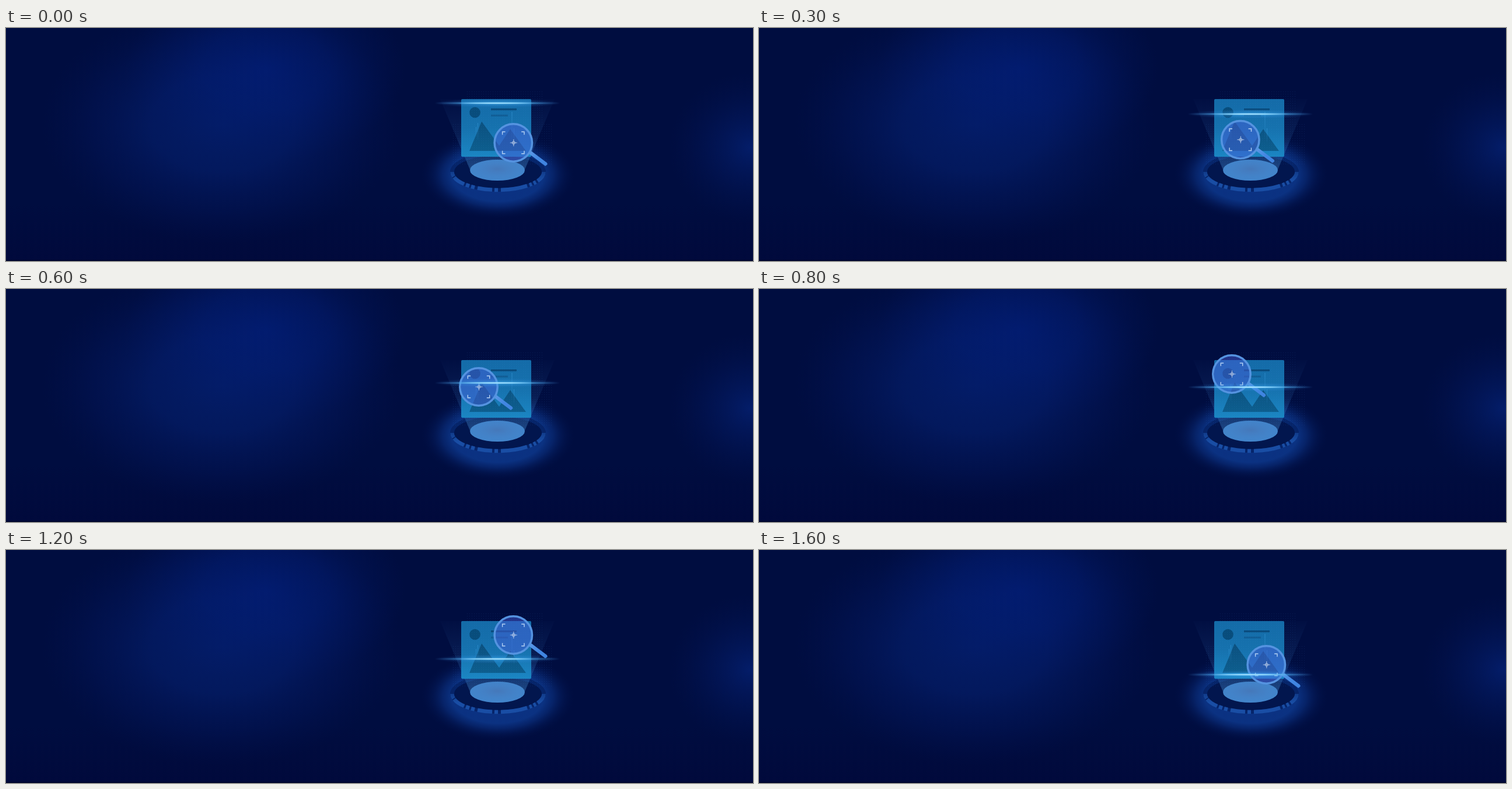
Recreate the animation shown at these times as an HTML page with a canvas. Size 1280 px wide and 400 px high, loop 1.8 s.

```html
<!DOCTYPE html>
<html lang="en">
<head>
<meta charset="utf-8">
<title>Image scan</title>
<style>
html, body { margin: 0; width: 100%; height: 100%; overflow: hidden; background: #000d40; }
canvas { display: block; width: 1280px; height: 400px; }
</style>
</head>
<body>
<canvas id="stage" width="1280" height="400"></canvas>
<script>
const W = 1280, H = 400, LOOP = 1800, STEP = 100, LAST = 16;
const stage = document.getElementById('stage').getContext('2d');

// Pose every 400 ms: lens x, lens y, scan line y
const POSES = [
  [869.3, 197, 129],
  [810, 190, 154],
  [810, 146, 168.5],
  [869.3, 146, 187],
  [869.3, 197, 214]
];

function addStops(g, stops) {
  for (const [at, color] of stops) g.addColorStop(at, color);
  return g;
}

function linear(c, x0, y0, x1, y1, stops) {
  return addStops(c.createLinearGradient(x0, y0, x1, y1), stops);
}

function glow(c, x, y, rx, ry, stops) {
  c.save();
  c.translate(x, y);
  c.scale(1, ry / rx);
  c.fillStyle = addStops(c.createRadialGradient(0, 0, 0, 0, 0, rx), stops);
  c.beginPath();
  c.arc(0, 0, rx, 0, 7);
  c.fill();
  c.restore();
}

function ellipse(c, x, y, rx, ry, fill) {
  c.fillStyle = fill;
  c.beginPath();
  c.ellipse(x, y, rx, ry, 0, 0, Math.PI * 2);
  c.fill();
}

function poly(c, points, fill) {
  c.fillStyle = fill;
  c.beginPath();
  for (const [x, y] of points) c.lineTo(x, y);
  c.closePath();
  c.fill();
}

function bar(c, x, y, w, h, fill) {
  c.fillStyle = fill;
  c.fillRect(x, y, w, h);
}

function line(c, points) {
  c.beginPath();
  for (const [x, y] of points) c.lineTo(x, y);
  c.stroke();
}

function drawBackdrop(c) {
  bar(c, 0, 0, W, H, '#000d40');
  bar(c, 0, 0, W, H, linear(c, 0, 300, 0, H, [[0, 'rgba(1,8,58,0)'], [1, 'rgba(1,8,58,.7)']]));
  glow(c, 370, 165, 310, 205, [
    [0, 'rgba(4,31,109,.85)'], [.4, 'rgba(4,29,104,.72)'],
    [.72, 'rgba(3,23,92,.4)'], [1, 'rgba(2,18,80,0)']
  ]);
  glow(c, 445, 70, 240, 160, [
    [0, 'rgba(2,30,122,.7)'], [.45, 'rgba(2,29,116,.5)'], [1, 'rgba(2,24,100,0)']
  ]);
  glow(c, 1275, 205, 140, 130, [
    [0, 'rgba(5,34,118,.75)'], [.5, 'rgba(3,25,96,.45)'], [1, 'rgba(2,18,80,0)']
  ]);
  bar(c, 0, 398, W, 2, 'rgba(0,4,36,.6)');
}

function drawBase(c) {
  glow(c, 843, 252, 132, 76, [
    [0, 'rgba(14,58,148,.8)'], [.6, 'rgba(14,60,148,.78)'],
    [.72, 'rgba(11,50,132,.6)'], [.86, 'rgba(6,34,104,.28)'], [1, 'rgba(2,18,74,0)']
  ]);
  ellipse(c, 843, 247, 82, 34, 'rgba(5,32,98,.75)');
  ellipse(c, 843, 247, 75, 28, 'rgba(2,20,76,.9)');

  // Broken front rim, given as horizontal spans
  const spans = [
    [764.5, 767], [768, 785], [788, 794], [797, 803], [808, 833],
    [837, 843], [848, 893], [897, 901], [904, 908], [911, 921.5]
  ];
  const angle = x => Math.acos((x - 843) / 78.5);
  c.strokeStyle = linear(c, 0, 240, 0, 262, [[0, 'rgba(26,80,168,.35)'], [1, 'rgba(26,80,168,.95)']]);
  c.lineWidth = 6.5;
  for (const [from, to] of spans) {
    c.beginPath();
    c.ellipse(843, 247, 78.5, 31, 0, angle(to), angle(from));
    c.stroke();
  }
}

function drawHologram(c) {
  poly(c, [[744, 122], [940, 122], [889, 243], [795, 243]],
    linear(c, 0, 122, 0, 243, [[0, 'rgba(50,110,180,.02)'], [.5, 'rgba(50,110,180,.16)'], [1, 'rgba(60,125,190,.46)']]));
  ellipse(c, 842, 244, 47, 18, '#4284ca');
  glow(c, 842, 242, 44, 17, [[0, 'rgba(70,116,180,.75)'], [1, 'rgba(70,126,196,0)']]);

  c.beginPath();
  c.roundRect(780, 122, 120, 99, 2);
  c.fillStyle = linear(c, 0, 122, 0, 221, [[0, '#146ba8'], [.5, '#1672ae'], [1, '#1b86c3']]);
  c.fill();
  ellipse(c, 803.5, 145, 9.3, 9.3, '#084d7c');
  bar(c, 831, 138, 44, 3.3, '#0a4c7e');
  bar(c, 831, 148.7, 29, 3, '#115d95');
  poly(c, [[794, 211], [815, 160.5], [845, 202], [864, 173.5], [891, 211]],
    linear(c, 0, 160, 0, 211, [[0, '#0b507f'], [1, '#0d5e8e']]));

  for (const [x, y, h] of [[866.5, 144, 46], [808, 163, 30], [805, 170, 18], [870, 172, 24]]) {
    bar(c, x, y, 1, h, linear(c, 0, y, 0, y + h, [[0, 'rgba(65,165,230,.5)'], [1, 'rgba(65,165,230,.04)']]));
  }

  // Faint projection grid
  c.fillStyle = 'rgba(70,140,220,.13)';
  for (let y = 109; y < 234; y += 4) {
    const inset = y < 165 ? 790 : 766;
    for (let x = inset; x < (y < 165 ? 920 : 935); x += 4) c.fillRect(x, y, 1, 1);
  }
}

function drawLens(c, x, y) {
  c.save();
  c.translate(x, y);
  c.lineWidth = 6;
  c.lineCap = 'butt';
  c.strokeStyle = linear(c, 28, 17, 57, 39, [[0, '#5a98e6'], [.5, '#4287e2'], [1, '#3f83df']]);
  line(c, [[28, 16], [56, 37]]);
  c.lineWidth = 3;
  c.lineCap = 'round';
  line(c, [[55, 38.2], [57, 36.4]]);

  ellipse(c, 0, 0, 32.5, 32.5, 'rgba(68,92,214,.5)');
  c.lineWidth = 3.5;
  c.strokeStyle = '#5593e0';
  c.beginPath();
  c.arc(0, 0, 32.2, 0, 7);
  c.stroke();

  c.lineCap = 'butt';
  c.strokeStyle = '#b5d2f4';
  c.lineWidth = 1.4;
  for (const sx of [-1, 1]) {
    for (const sy of [-1, 1]) {
      line(c, [[13.8 * sx, 18.7 * sy], [18.7 * sx, 18.7 * sy], [18.7 * sx, 13.8 * sy]]);
    }
  }
  c.lineWidth = 1;
  c.strokeStyle = 'rgba(200,216,238,.85)';
  line(c, [[-5.5, 0], [6.5, 0]]);
  line(c, [[.5, -6], [.5, 6]]);
  c.beginPath();
  c.arc(.5, 0, 2.5, 0, 7);
  c.stroke();
  c.restore();
}

function drawScan(c, y) {
  glow(c, 842, y, 108, 8, [
    [0, 'rgba(70,175,245,.5)'], [.5, 'rgba(60,160,235,.26)'], [1, 'rgba(40,120,220,0)']
  ]);
  bar(c, 735, y - 1.5, 214, 3, linear(c, 735, 0, 949, 0, [
    [0, 'rgba(80,160,230,0)'], [.2, 'rgba(75,165,230,.5)'],
    [.42, 'rgba(120,205,250,.75)'], [.6, 'rgba(120,205,250,.75)'],
    [.8, 'rgba(75,165,230,.5)'], [1, 'rgba(80,160,230,0)']
  ]));
  glow(c, 840, y, 70, 1.6, [[0, 'rgba(190,235,255,.9)'], [.6, 'rgba(150,220,255,.6)'], [1, 'rgba(120,200,250,0)']]);
}

function poseAt(ms) {
  const tick = Math.min(LAST, Math.floor((ms % LOOP) / STEP));
  const i = Math.min(3, Math.floor(tick / 4));
  const f = tick / 4 - i;
  return POSES[i].map((v, k) => v + (POSES[i + 1][k] - v) * f);
}

const still = document.createElement('canvas');
still.width = W;
still.height = H;
const layer = still.getContext('2d');
drawBackdrop(layer);
drawBase(layer);
drawHologram(layer);

const start = performance.now();

function render() {
  const [x, y, scan] = poseAt(performance.now() - start);
  stage.drawImage(still, 0, 0);
  drawLens(stage, x, y);
  drawScan(stage, scan);
  requestAnimationFrame(render);
}
render();
</script>
</body>
</html>
```
